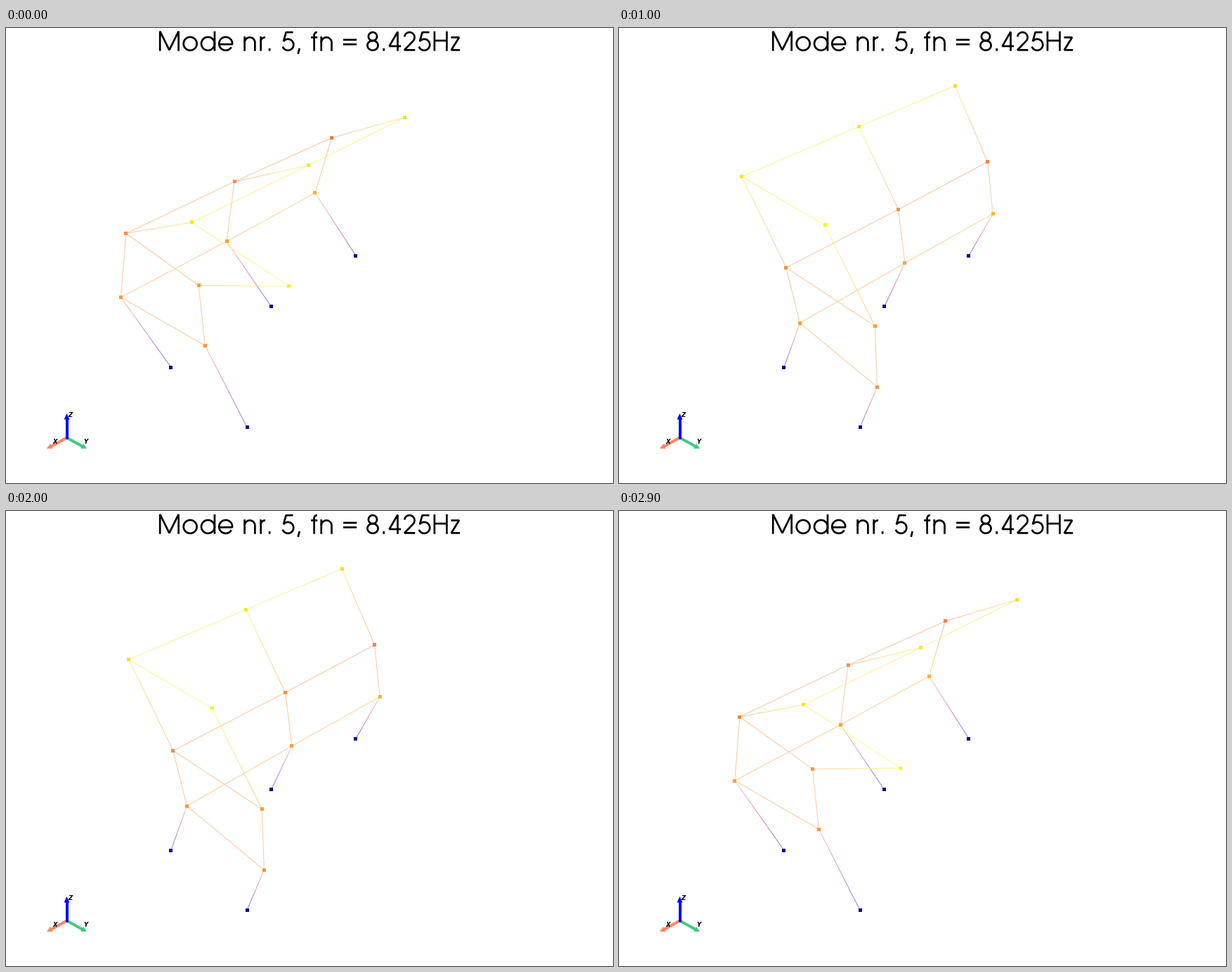
These frames come from a looping animation (864 px wide and 648 px high, 3000 ms). A matplotlib script:

```python
import numpy as np
import matplotlib.pyplot as plt
from matplotlib.animation import FuncAnimation
from matplotlib.collections import LineCollection
from matplotlib.patches import Polygon, Rectangle

W, H, DPI = 864, 648, 100
PX = 72 / DPI  # points per pixel
FRAMES, INTERVAL = 30, 100

fig = plt.figure(figsize=(W / DPI, H / DPI), dpi=DPI, facecolor="white")
ax = fig.add_axes([0, 0, 1, 1])
ax.set_xlim(0, W)
ax.set_ylim(H, 0)
ax.axis("off")

# ---- title: geometric lettering built from stems, bars and arcs (em units) ----
CAP, XH, PEN = .74, .547, .072
HALF = PEN / 2
BOWL = XH / 2 - HALF / 2 - .005
DIGIT = .554
ADVANCE = dict.fromkeys("2458", DIGIT) | dict.fromkeys(" .,", DIGIT / 2) | {
    "M": .919, "H": .683, "o": .655, "d": .685, "e": .65,
    "n": .61, "r": .301, "f": .314, "z": .425, "=": .606}


def arc(cx, cy, rx, ry, start=0, end=362):
    t = np.radians(np.linspace(start, end, 40))
    return list(zip(cx + rx * np.cos(t), cy + ry * np.sin(t)))


def stem(x, top):
    return [(x, 0), (x, top)]


def bar(y, width, margin):
    return [(margin, y), (width - margin, y)]


def strokes(ch):
    w = ADVANCE[ch]
    mid = w / 2
    side = .11
    if ch == "M":
        return [[(side, 0), (side, CAP), (mid, HALF), (w - side, CAP), (w - side, 0)]]
    if ch == "H":
        return [stem(side, CAP), stem(w - side, CAP), bar(CAP / 2 + .02, w, side)]
    if ch in "od":
        ring = arc(w / 2, XH / 2, BOWL, BOWL)
        return [ring] if ch == "o" else [ring, stem(mid + BOWL, CAP)]
    if ch == "e":
        return [[(mid - BOWL, BOWL)] + arc(mid, XH / 2, BOWL, BOWL, -5, 328)]
    if ch == "n":
        r = mid - side
        return [stem(side, XH), [(w - side, 0)] + arc(mid, XH - HALF - r, r, r, 0, 180)]
    if ch == "r":
        return [stem(side, XH), arc(w - HALF, .34, .16, .17, 180, 85)]
    if ch == "f":
        return [[(mid, 0)] + arc(w - .05, .59, .11, CAP - .625, 180, 88),
                bar(XH - HALF, w, HALF)]
    if ch == "z":
        y = XH - HALF
        return [[(.05, y), (w - .07, y), (.06, HALF), (w - .04, HALF)]]
    if ch == "2":
        return [arc(mid, .51, .19, CAP - HALF - .51, 172, -38)
                + [(.085, HALF), (w - .065, HALF)]]
    if ch == "4":
        return [[(.385, 0), (.385, CAP - .02), (.07, .18), (w - .045, .18)]]
    if ch == "5":
        y = CAP - HALF
        return [[(w - .085, y), (.205, y)] + arc(mid, .235, .21, .212, 143, -160)]
    if ch == "8":
        return [arc(mid, .545, .16, .16), arc(mid, .208, .2, .182)]
    if ch == "=":
        return [bar(y, w, .05) for y in (.25, .42)]
    if ch == ".":
        return [stem(mid, .1)]
    if ch == ",":
        return [[(mid + .02, .1), (mid - .035, -.11)]]
    return []


def draw_title(text, baseline, em):
    x = W / 2 - em * (sum(ADVANCE[c] for c in text) + .035) / 2
    for ch in text:
        for stroke in strokes(ch):
            p = np.array(stroke)
            ax.plot(x + em * p[:, 0], baseline - em * p[:, 1], color="black",
                    lw=PEN * em * PX, solid_capstyle="butt",
                    solid_joinstyle="bevel", snap=False)
        x += ADVANCE[ch] * em


draw_title("Mode nr. 5, fn = 8.425Hz", 32.7, 37.8)

# ---- orientation marker ----
ORIGIN = np.array([86.5, 583.5])


def axis_arrow(angle, length, color, name, offset):
    u = np.array([np.cos(np.radians(angle)), -np.sin(np.radians(angle))])
    n = np.array([-u[1], u[0]])
    neck, tip = ORIGIN + .75 * length * u, ORIGIN + length * u
    ax.plot(*zip(ORIGIN, neck), color=color, lw=4 * PX, solid_capstyle="round")
    cone = Polygon([neck + 4 * n, tip, neck - 4 * n], fc=color, lw=0)
    ax.add_patch(cone)
    cone.set_clip_path(Rectangle((0, 0), W, 599, transform=ax.transData))
    ax.text(*(ORIGIN + offset), name, family="DejaVu Sans", style="italic",
            weight="bold", size=8.5 * PX, ha="center", va="center_baseline")


axis_arrow(209, 33, "#ff8562", "X", (-16.5, 5.5))
axis_arrow(-29, 33, "#3dcb80", "Y", (27.5, 5.5))
axis_arrow(90, 34.5, "#0000ff", "Z", (5, -33))

# ---- building frame in 3D, in units of the camera distance ----
FOCAL = H / 2 / np.tan(np.radians(15))
BAY, SPAN, STOREY = .161, .1345, .0804
CORNER = np.array([.008, -.0615, -.1074])

plan = [(-BAY, 0), (0, 0), (BAY, 0), (BAY, SPAN)]
rest = CORNER + np.array([(x, y, k * STOREY) for k in range(4) for x, y in plan])

# horizontal mode shape (x, y) of the four columns, storey by storey
shape = np.zeros((4, 4, 3))
shape[1, :, :2] = [(.0152, -.0654), (.0172, -.0612), (.0167, -.0602), (.0014, -.061)]
shape[2, :, :2] = [(-.0059, -.0558), (0, -.0599), (-.0018, -.059), (.0015, -.062)]
shape[3, :, :2] = [(.0083, .0755), (.0088, .077), (.0057, .0768), (.0095, .0805)]
shape = shape.reshape(16, 3)
level = np.linalg.norm(shape, axis=1)
level /= level.max()

columns = [(i, i + 4) for i in range(12)]
beams = [(k + i, k + i + 1) for k in (4, 8, 12) for i in range(3)]
A, B = np.array(columns + beams).T
PIECES = 16
STEP = np.linspace(0, 1, PIECES + 1)[None, :, None]


def project(p):
    """Isometric view direction with perspective."""
    x, y, z = p.T
    scale = FOCAL / (1 - (x + y + z) / np.sqrt(3))
    return np.column_stack([W / 2 + scale * (y - x) / np.sqrt(2),
                            H / 2 - scale * (2 * z - x - y) / np.sqrt(6)])


def nodes(frame):
    return project(rest + shape * np.cos(2 * np.pi * frame / FRAMES))


def segments(p):
    path = p[A][:, None] + (p[B] - p[A])[:, None] * STEP
    return np.stack([path[:, :-1], path[:, 1:]], axis=2).reshape(-1, 2, 2)


cmap = plt.get_cmap("plasma")
mid = (np.arange(PIECES) + .5) / PIECES
shade = level[A][:, None] + (level[B] - level[A])[:, None] * mid
tint = 1 - .5 * (1 - cmap(shade.ravel())[:, :3])

bars = LineCollection(segments(nodes(0)), colors=tint, linewidths=PX,
                      capstyle="round", snap=False, zorder=3)
ax.add_collection(bars)
dots = ax.scatter(*nodes(0).T, c=cmap(level), marker="s",
                  s=(5 * PX) ** 2, linewidths=0, zorder=4)


def update(frame):
    p = nodes(frame)
    bars.set_segments(segments(p))
    dots.set_offsets(p)
    return bars, dots


anim = FuncAnimation(fig, update, frames=FRAMES, interval=INTERVAL,
                     repeat=True, repeat_delay=0, blit=False)
plt.show()
```
